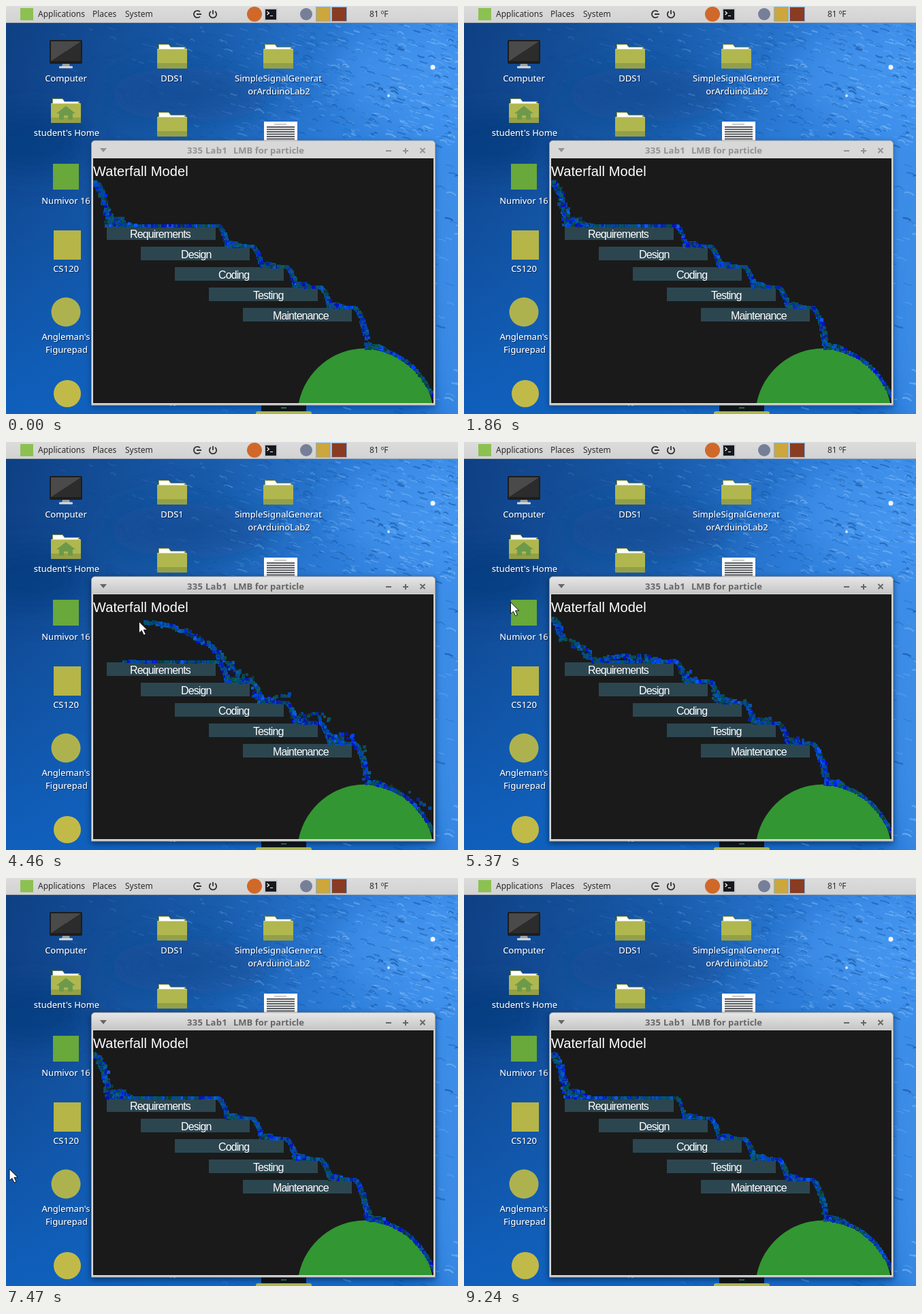
Recreate the animation shown at these times as an HTML page with a canvas. Size 664 by 600 pixels, loop 9350 ms.

```html
<!DOCTYPE html>
<html lang="en">
<head>
<meta charset="utf-8">
<title>Waterfall Model</title>
<style>
  html, body { margin: 0; width: 100%; height: 100%; overflow: hidden; background: #1458ac; }
  svg, canvas { position: absolute; left: 0; top: 0; display: block; }
  canvas { left: 128px; top: 224px; }
  .ui { font: 12px "Noto Sans", sans-serif; fill: #2b2b2b; }
  .label { font: 13px "Noto Sans", sans-serif; fill: #fff; text-anchor: middle; filter: url(#drop); }
  .title { font: bold 13px "Noto Sans", sans-serif; }
  .step { font: 16px "Liberation Sans", Arial, sans-serif; letter-spacing: -.9px; fill: #fff; }
  .head { font: 20px "Liberation Sans", Arial, sans-serif; letter-spacing: .1px; fill: #fff; }
</style>
</head>
<body>
<svg width="664" height="600" viewBox="0 0 664 600">
  <defs>
    <linearGradient id="sea" x1="0" y1="0" x2="1" y2=".25">
      <stop offset="0" stop-color="#0e3f82"/>
      <stop offset=".45" stop-color="#195cac"/>
      <stop offset=".75" stop-color="#2c7cd8"/>
      <stop offset="1" stop-color="#3f92ee"/>
    </linearGradient>
    <linearGradient id="deep" x1="0" y1="0" x2="0" y2="1">
      <stop offset=".3" stop-color="#0e5cb8" stop-opacity="0"/>
      <stop offset="1" stop-color="#0e62c2" stop-opacity=".85"/>
    </linearGradient>
    <linearGradient id="bar" x1="0" y1="0" x2="0" y2="1">
      <stop offset="0" stop-color="#dcdcdc"/>
      <stop offset="1" stop-color="#d2d2d2"/>
    </linearGradient>
    <linearGradient id="active" x1="0" y1="0" x2="0" y2="1">
      <stop offset="0" stop-color="#e6e6e6"/>
      <stop offset="1" stop-color="#c6c6c6"/>
    </linearGradient>
    <linearGradient id="screen" x1="0" y1="0" x2="1" y2="1">
      <stop offset=".5" stop-color="#4a4a4a"/>
      <stop offset=".5" stop-color="#2c2c2c"/>
    </linearGradient>
    <filter id="drop" x="-10%" y="-20%" width="120%" height="150%">
      <feDropShadow dx="1" dy="1" stdDeviation=".7" flood-color="#001a40" flood-opacity=".8"/>
    </filter>
    <filter id="soft" x="-50%" y="-50%" width="200%" height="200%"><feGaussianBlur stdDeviation="22"/></filter>
    <filter id="shade" x="-10%" y="-10%" width="120%" height="120%"><feGaussianBlur stdDeviation="4"/></filter>
    <g id="folder">
      <path d="M-20-18h15l3 4h22v14h-40z" fill="#8f9a3a"/>
      <path d="M-19-17h14l3 4h20v8h-37z" fill="#fff"/>
      <rect x="-22" y="-11" width="44" height="29" rx="1.5" fill="#b0b74f"/>
      <path d="M-21.500-10.500h43" stroke="#d4da86"/>
      <path d="M-22 10h44v6.500a1.500 1.500 0 0 1-1.500 1.500h-41a1.500 1.500 0 0 1-1.500-1.500z" fill="#94a046"/>
    </g>
  </defs>

  <rect width="664" height="600" fill="url(#sea)"/>
  <rect width="664" height="600" fill="url(#deep)"/>
  <g filter="url(#soft)">
    <ellipse cx="590" cy="100" rx="110" ry="70" fill="#4c9cf4" opacity=".5"/>
    <ellipse cx="40" cy="200" rx="80" ry="45" fill="#093a7c" opacity=".6"/>
    <ellipse cx="270" cy="130" rx="120" ry="40" fill="#10498f" opacity=".6"/>
    <ellipse cx="664" cy="420" rx="50" ry="230" fill="#3f8ee8" opacity=".9"/>
  </g>
  <g id="waves" fill="none" stroke-linecap="round"></g>
  <circle cx="627" cy="90" r="3.500" fill="#eef6ff"/>
  <circle cx="562" cy="132" r="2" fill="#cfe4ff"/>

  <rect width="664" height="25" fill="url(#bar)"/>
  <path d="M0 24.500h664" stroke="#a9b0b8"/>
  <rect x="21" y="3" width="19" height="18" fill="#8cc152"/>
  <g class="ui">
    <text x="47" y="16">Applications</text>
    <text x="127" y="16">Places</text>
    <text x="175" y="16">System</text>
    <text x="534" y="16">81 ºF</text>
  </g>
  <g fill="none" stroke="#333" stroke-width="1.800">
    <path d="M285 8.500a5.200 5.200 0 1 0 0 7M280 12h7"/>
    <path d="M301 8a5.200 5.200 0 1 0 6 0M304 6v6"/>
  </g>
  <circle cx="365" cy="12" r="11" fill="#d0682a"/>
  <rect x="379" y="3" width="20" height="20" rx="2" fill="#c4c8cc"/>
  <rect x="381" y="5" width="16" height="15" fill="#16181c"/>
  <path d="M383.500 8l3 2.500-3 2.500M388 14.500h4" fill="none" stroke="#fff" stroke-width="1.200"/>
  <circle cx="441" cy="12" r="9" fill="#767f98"/>
  <g stroke="#78b4e8">
    <rect x="455.500" y="1.500" width="21" height="21" fill="#cda63c"/>
    <rect x="478.500" y="1.500" width="22" height="21" fill="#8a3c22"/>
  </g>

  <rect x="64" y="50" width="48" height="35" rx="2" fill="#1d1d1d"/>
  <rect x="66" y="52" width="44" height="29" fill="url(#screen)"/>
  <path d="M83 85h10l1 4h-12z" fill="#9aa0a4"/>
  <rect x="78" y="88.500" width="20" height="3" rx="1" fill="#d8dcde"/>
  <use href="#folder" x="244" y="74"/>
  <use href="#folder" x="400" y="74"/>
  <use href="#folder" x="244" y="174"/>
  <use href="#folder" x="88" y="154"/>
  <path d="M74 158l14-11 14 11h-4v9h-7v-6h-6v6h-7v-9z" fill="#6d9a4a"/>
  <rect x="69" y="232" width="38" height="38" fill="#69a83a"/>
  <rect x="70" y="330" width="40" height="43" fill="#b6b548"/>
  <circle cx="88" cy="450" r="21.500" fill="#aeb24e"/>
  <circle cx="90" cy="570" r="20" fill="#c2ba48"/>
  <rect x="379" y="170" width="49" height="30" fill="#fff"/>
  <path d="M383 178h41M383 181.500h41M383 185h41M383 188.500h41M383 192h41M383 195.500h41" stroke="#55585c" stroke-width="2.200"/>
  <path d="M394 174h18" stroke="#999"/>
  <rect x="375" y="584" width="66" height="13" fill="#10181c"/>
  <path d="M404 591h8" stroke="#3a7a4a" stroke-width="2"/>
  <rect x="367" y="596" width="82" height="8" rx="3" fill="#b0b74f"/>
  <path d="M241 587.500h2m3 0h3" stroke="#fff"/>
  <g class="label">
    <text x="88" y="111">Computer</text>
    <text x="244" y="111">DDS1</text>
    <text x="400" y="111">SimpleSignalGenerat</text>
    <text x="401" y="130">orArduinoLab2</text>
    <text x="89" y="191">student's Home</text>
    <text x="88" y="291">Numivor 16</text>
    <text x="88" y="391">CS120</text>
    <text x="88" y="491">Angleman's</text>
    <text x="89" y="510">Figurepad</text>
  </g>

  <rect id="shadow" x="125" y="200" width="506" height="390" fill="#000" filter="url(#shade)"/>
  <path d="M125.500 587v-384a5 5 0 0 1 5-5h495a5 5 0 0 1 5 5v384z" fill="#d6d6d6" stroke="#9b9b9b"/>
  <path id="caption" d="M126 223v-20a4.500 4.500 0 0 1 4.500-4.500h495a4.500 4.500 0 0 1 4.500 4.500v20z"/>
  <g id="marks">
    <g class="title">
      <text x="266" y="217" letter-spacing=".3">335 Lab1</text>
      <text x="334" y="217">LMB for particle</text>
    </g>
    <path d="M138 209h10l-5 6z"/>
    <path d="M558 213h8M583 213h8M587 209v8M608.500 209l7 7M615.500 209l-7 7" stroke-width="2"/>
  </g>
  <rect x="128" y="224" width="500" height="360" fill="#1a1a1a"/>
  <g id="steps"></g>
  <path d="M429.900 584A100 100 0 0 1 626.100 584z" fill="#329632"/>
  <text class="head" x="128" y="250">Waterfall Model</text>
</svg>
<canvas id="water" width="500" height="360"></canvas>
<svg width="664" height="600" viewBox="0 0 664 600">
  <path id="cursor" d="M0 0v17l4-3.500 3 6.500 3-1.300-3-6.400h5.300z" fill="#fff" stroke="#111" stroke-width="1"/>
</svg>
<script>
const $ = id => document.getElementById(id);
const LOOP = 9350, FRAMES = 167, STEP = 9240 / 166, SUB = 4;
const DT = STEP / SUB / 1000, WARMUP = 18000, GRAVITY = 262, RATE = 3;
const PRESS = 2990, RELEASE = 4870, HIDE = 8300;
const BALL = { x: 528, y: 604, r: 101, damp: .7 };
const steps = [['Requirements', 182], ['Design', 257], ['Coding', 312], ['Testing', 363], ['Maintenance', 392]]
  .map(([name, tx], i) => ({ name, tx, x: 148 + 50 * i, y: 324 + 30 * i }));

// time, x, y of the pointer tip
const track = [
  [2990, 618, 428], [3100, 548, 428], [3150, 512, 417], [3230, 460, 364], [3285, 438, 357],
  [3380, 388, 300], [3480, 342, 268], [3890, 282, 265], [4455, 195, 264], [4870, 133, 261],
  [5000, 108, 246], [5400, 62, 234], [5850, 51, 232], [6030, 18, 282], [6178, -5, 342],
  [6450, 0, 400], [6700, 5, 428]
];

function pointer(t) {
  const i = track.findIndex(k => k[0] > t);
  if (i < 0) return track[track.length - 1].slice(1);
  if (i === 0) return track[0].slice(1);
  const a = track[i - 1], b = track[i], f = (t - a[0]) / (b[0] - a[0]);
  return [a[1] + (b[1] - a[1]) * f, a[2] + (b[2] - a[2]) * f];
}

function seeded(s) {
  return () => {
    s = (s + 0x6D2B79F5) | 0;
    let v = Math.imul(s ^ (s >>> 15), 1 | s);
    v = (v + Math.imul(v ^ (v >>> 7), 61 | v)) ^ v;
    return ((v ^ (v >>> 14)) >>> 0) / 4294967296;
  };
}

const rnd = seeded(335);
const between = (a, b) => a + (b - a) * rnd();

// Ripples grow denser and lighter towards the right.
function drawWaves() {
  let out = '';
  for (let i = 0; i < 1100; i++) {
    const x = 664 * Math.sqrt(rnd()), y = i % 4 ? between(26, 205) : between(200, 600);
    const w = between(3, 14), h = between(-4, 4), near = x / 664, light = rnd() < .15 + .5 * near;
    out += `<path d="M${x.toFixed(1)} ${y.toFixed(1)}q${(w / 2).toFixed(1)} ${h.toFixed(1)} ${w.toFixed(1)} ${(w * .3).toFixed(1)}"
      stroke="${light ? '#8cc4fb' : '#0b4690'}" stroke-width="${between(.7, 2.4).toFixed(1)}" opacity="${(between(.15, .6) * near).toFixed(2)}"/>`;
  }
  $('waves').innerHTML = out;
}

const colors = Array.from({ length: 24 }, (_, i) => {
  const green = i % 3 === 0;
  const g = green ? between(55, 95) : between(15, 95);
  const b = green ? between(40, 110) : between(140, 250);
  return `rgb(${between(0, 14) | 0},${g | 0},${b | 0})`;
});

function emit(t) {
  const held = t >= PRESS && t < RELEASE;
  const [x, y] = held ? pointer(t - 50) : [128, 259];
  return {
    x: x + between(-2, 4), y: y + between(-1, 3),
    vx: between(28, 42), vy: between(-6, 6),
    bounce: between(.33, .43), size: rnd() < .6 ? 4 : 5, color: rnd() * colors.length | 0
  };
}

function move(p) {
  p.vy += GRAVITY * DT;
  p.x += p.vx * DT;
  p.y += p.vy * DT;
  for (const s of steps) {
    if (p.vy > 0 && p.x > s.x - 2 && p.x < s.x + 162 && p.y > s.y - 1 && p.y < s.y + 8) {
      p.y = s.y - 1;
      p.vy *= -p.bounce;
    }
  }
  const dx = p.x - BALL.x, dy = p.y - BALL.y, d = Math.hypot(dx, dy);
  if (d < BALL.r) {
    const nx = dx / d, ny = dy / d, into = p.vx * nx + p.vy * ny;
    p.x = BALL.x + nx * BALL.r;
    p.y = BALL.y + ny * BALL.r;
    if (into < 0) {
      const kick = (1 + p.bounce * BALL.damp) * into;
      p.vx -= kick * nx;
      p.vy -= kick * ny;
    }
  }
}

// Run the fluid once; keep x, y, size and colour for every picture.
function simulate() {
  const shots = [], warm = Math.round(WARMUP / (DT * 1000));
  let live = [];
  for (let n = -warm; n <= (FRAMES - 1) * SUB; n++) {
    if (n >= 0 && n % SUB === 0) {
      const shot = new Int16Array(live.length * 4);
      live.forEach((p, i) => shot.set([
        Math.round(p.x - p.size / 2) - 128, Math.round(p.y - p.size / 2) - 224, p.size, p.color
      ], i * 4));
      shots.push(shot);
    }
    const t = n * DT * 1000;
    for (let i = 0; i < RATE; i++) live.push(emit(t + i * DT * 1000 / RATE));
    live.forEach(move);
    live = live.filter(p => p.x < 634 && p.y < 590);
  }
  return shots;
}

drawWaves();
$('steps').innerHTML = steps.map(s =>
  `<rect x="${s.x}" y="${s.y}" width="160" height="20" fill="#2c4650"/>
   <text class="step" x="${s.tx}" y="${s.y + 17}">${s.name}</text>`).join('');

const shots = simulate();
const ctx = $('water').getContext('2d');
let shown = -1;

function render(time) {
  const k = Math.min(FRAMES - 1, Math.floor((time % LOOP) / STEP + .01));
  if (k === shown) return;
  shown = k;
  const t = k * STEP, shot = shots[k];

  ctx.clearRect(0, 0, 500, 360);
  for (let i = 0; i < shot.length; i += 4) {
    ctx.fillStyle = colors[shot[i + 3]];
    ctx.fillRect(shot[i], shot[i + 1], shot[i + 2], shot[i + 2]);
  }

  const focused = t >= PRESS, ink = focused ? '#666' : '#929292';
  $('caption').setAttribute('fill', focused ? 'url(#active)' : '#d8d8d8');
  $('marks').setAttribute('fill', ink);
  $('marks').lastElementChild.setAttribute('stroke', ink);
  $('shadow').setAttribute('opacity', focused ? .5 : .3);

  const [x, y] = pointer(t);
  $('cursor').setAttribute('transform', `translate(${x.toFixed(1)} ${y.toFixed(1)})`);
  $('cursor').setAttribute('visibility', t >= PRESS && t < HIDE ? 'visible' : 'hidden');
}

const start = performance.now();
function tick() {
  render(performance.now() - start);
  requestAnimationFrame(tick);
}
tick();
</script>
</body>
</html>
```
